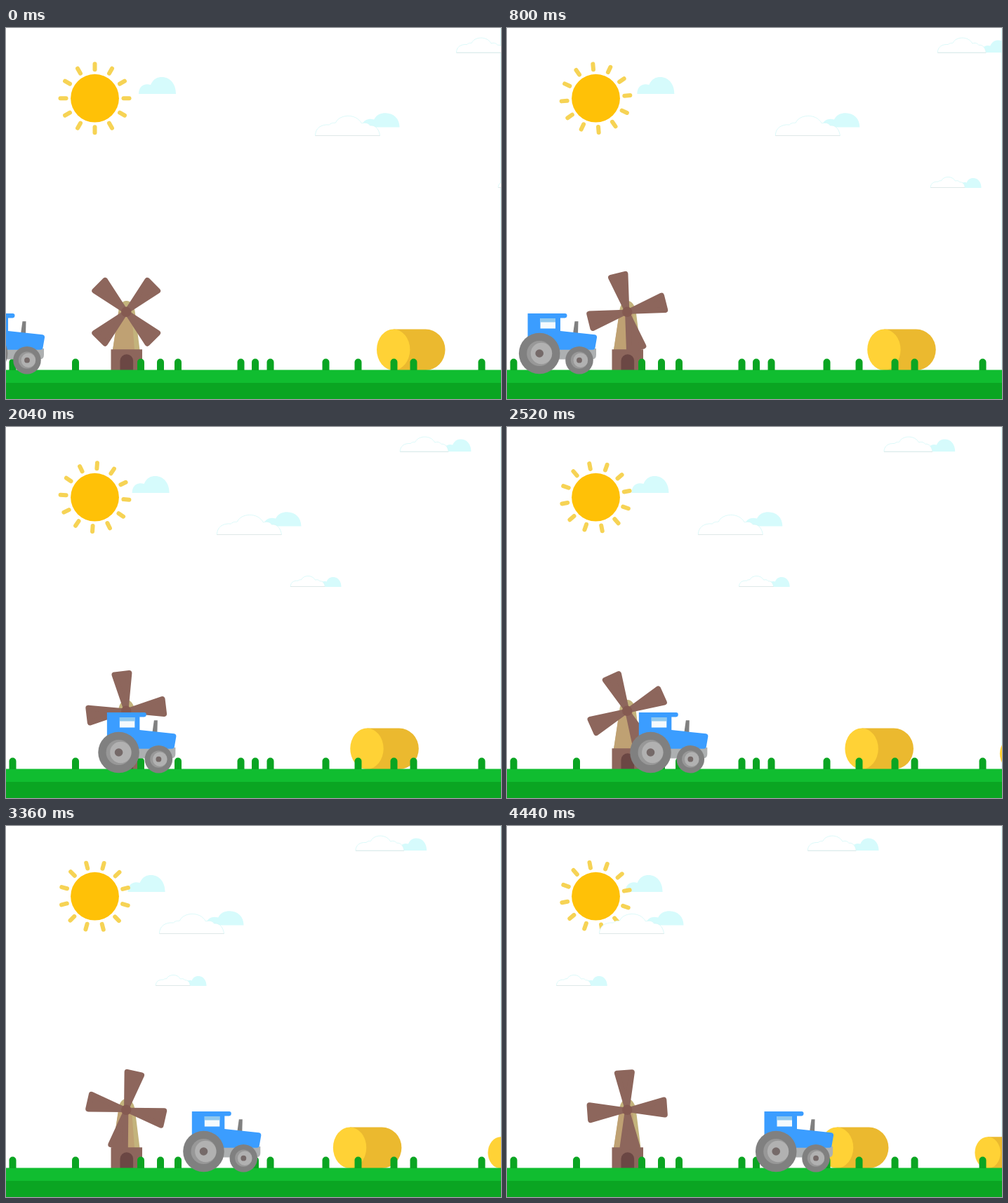
An HTML page that plays this animation: 705 by 529 pixels, repeating every 4480 ms.

```html
<!DOCTYPE html>
<html lang="en">
<head>
<meta charset="utf-8">
<title>Farm</title>
<style>
  html, body { margin: 0; width: 100%; height: 100%; overflow: hidden; background: #fff; }
  svg { display: block; width: 100vw; height: 100vh; }
  .white { fill: #fff; stroke: #d3f8f8; stroke-width: .8; vector-effect: non-scaling-stroke; }
  .base { stroke: #dfe8e8; stroke-width: 1; vector-effect: non-scaling-stroke; }
</style>
</head>
<body>
<svg viewBox="0 0 705 529" preserveAspectRatio="none">
  <defs>
    <path id="puff" fill="#d6fbfc" d="M0 24C0 13 8 8 17 11C21 2 27 0 33 0C45 0 53 10 53 24Z"/>
    <g id="cloud">
      <path class="white" d="M0 28.5C0 18 8 12 20 13C24 9 27 11 29 10C34-2 58-4 66 11C72 9 76 11 78 14C86 13 91 20 92 28.5Z"/>
      <path class="base" d="M0 28.5H92"/>
    </g>
    <g id="bale">
      <path fill="#ebb92f" d="M24 0H69.5A28 29.2 0 0 1 69.5 58.5H24Z"/>
      <ellipse cx="23.7" cy="29.2" rx="23.7" ry="29.2" fill="#ffd236"/>
    </g>
    <g id="wheel">
      <circle r="29.3" fill="#808080"/>
      <circle r="18" fill="#989898"/>
      <circle cx="2.8" r="15.2" fill="#b1b1b1"/>
      <circle r="5.8" fill="#756a69"/>
    </g>
  </defs>

  <path d="M704.5 0V487" stroke="#d9fbfc"/>
  <use id="haze" href="#puff"/>
  <g transform="translate(126.5 100.2)">
    <g id="rays" stroke="#f6d355" stroke-width="6" stroke-linecap="round"></g>
    <circle r="34.4" fill="#ffc107"/>
  </g>

  <g id="high">
    <use href="#puff" transform="translate(62.5 17.5) scale(.73)"/>
    <use href="#cloud" transform="translate(0 13.8) scale(.75)"/>
  </g>
  <g id="mid">
    <use href="#puff" transform="translate(66.5 121.3) scale(1.01 .84)"/>
    <use href="#cloud" transform="translate(0 125)"/>
  </g>
  <g id="low">
    <use href="#puff" transform="translate(41.5 214) scale(.58)"/>
    <use href="#cloud" transform="translate(0 212.3) scale(.533)"/>
  </g>

  <path fill="#c3b37c" d="M160 407C160 396 165 389 171.500 389S183 396 184 407L190.500 459H152Z"/>
  <path fill="#bfa173" d="M160 405L152 459H183L179 405Z"/>
  <path fill="#8d665c" d="M149.500 458.300H194V488H149.500Z"/>
  <path fill="#6b4744" d="M162.500 488V474.500a9.300 9.300 0 0 1 18.600 0V488Z"/>
  <g transform="translate(171.2 404.800)">
    <g id="blades" fill="#8d665c" stroke="#8d665c" stroke-width="8" stroke-linejoin="round"></g>
    <circle r="7.200" fill="#855a51"/>
  </g>

  <g id="bales">
    <use href="#bale" y="429.500"/>
    <use href="#bale" transform="translate(220.500 443.300) scale(.77)"/>
  </g>

  <path fill="#10bd30" d="M0 487.500H705V507H0Z"/>
  <path fill="#0aa522" d="M0 506H705V529H0Z"/>
  <g id="tufts" fill="#0aa522"></g>

  <!-- front axle at x = 0 -->
  <g id="tractor">
    <path fill="#adb0b1" d="M-40 457H24V466Q24 472.500 18 472.500H-40Z"/>
    <path fill="#808080" d="M-6.500 418.300H-1.500L-2 436H-9Z"/>
    <path fill="#3b9dff" d="M-73.500 407H-20.500Q-17.500 407-17.500 410T-20.500 413.500H-27V432L22 437.300Q25.500 438 25 441.500L22.500 456Q22 458.700 19 458.700H-73.500Z"/>
    <path fill="#f4fafd" d="M-55.500 414H-34V428.500H-55.500Z"/>
    <path fill="#8fc8ee" d="M-55.500 414H-34V419.500H-55.500Z"/>
    <use href="#wheel" x="-56.800" y="464"/>
    <use href="#wheel" transform="translate(0 473.700) scale(.675)"/>
  </g>
</svg>
<script>
const LOOP = 4480, STEP = 40;
const $ = id => document.getElementById(id);

$('rays').innerHTML = Array.from({length: 12}, (_, i) =>
  `<path d="M0-41V-49" transform="rotate(${i * 30})"/>`).join('');
$('blades').innerHTML = [0, 90, 180, 270].map(a =>
  `<path d="M0-4L-10.500-53H10.500Z" transform="rotate(${a})"/>`).join('');
$('tufts').innerHTML = [9.5, 99, 192, 220, 245, 334.5, 355, 376.5, 455.5, 501.5, 552.5, 580.5, 677.5]
  .map(x => `<path d="M${x - 5} 488V476.500a5 5 0 0 1 10 0V488Z"/>`).join('');

const times = [0, 480, 800, 1600, 2520, 3360, 4440];
const tracks = {
  high: [641.5, 624.5, 613.3, 582.6, 537, 498, 428.3],
  mid: [440.5, 405.5, 382.3, 326.8, 272.3, 218.5, 131.5],
  low: [701, 644.3, 603.3, 475.8, 330.5, 213.3, 70.5],
  tractor: [30, 74, 103, 177, 261.3, 338.3, 440]
};

// Smooth curve through unevenly spaced points
function along(v, t) {
  const last = times.length - 1;
  let i = 0;
  while (i < last - 1 && t > times[i + 1]) i++;
  const slope = k => {
    const a = Math.max(k - 1, 0), b = Math.min(k + 1, last);
    return (v[b] - v[a]) / (times[b] - times[a]);
  };
  const d = times[i + 1] - times[i], u = (t - times[i]) / d, w = 1 - u;
  return w * w * ((1 + 2 * u) * v[i] + u * d * slope(i))
       + u * u * ((3 - 2 * u) * v[i + 1] - w * d * slope(i + 1));
}

const move = (id, x, y = 0) => $(id).setAttribute('transform', `translate(${x} ${y})`);
const turn = (id, a) => $(id).setAttribute('transform', `rotate(${a})`);

function draw() {
  const t = Math.floor(performance.now() % LOOP / STEP) * STEP;
  for (const id in tracks) move(id, along(tracks[id], t));
  move('haze', 189 - t * .0046, 70);
  move('bales', 528 - t * .0185);
  turn('rays', t * .0314);
  turn('blades', 45 + t * .1511);
  requestAnimationFrame(draw);
}
draw();
</script>
</body>
</html>
```
